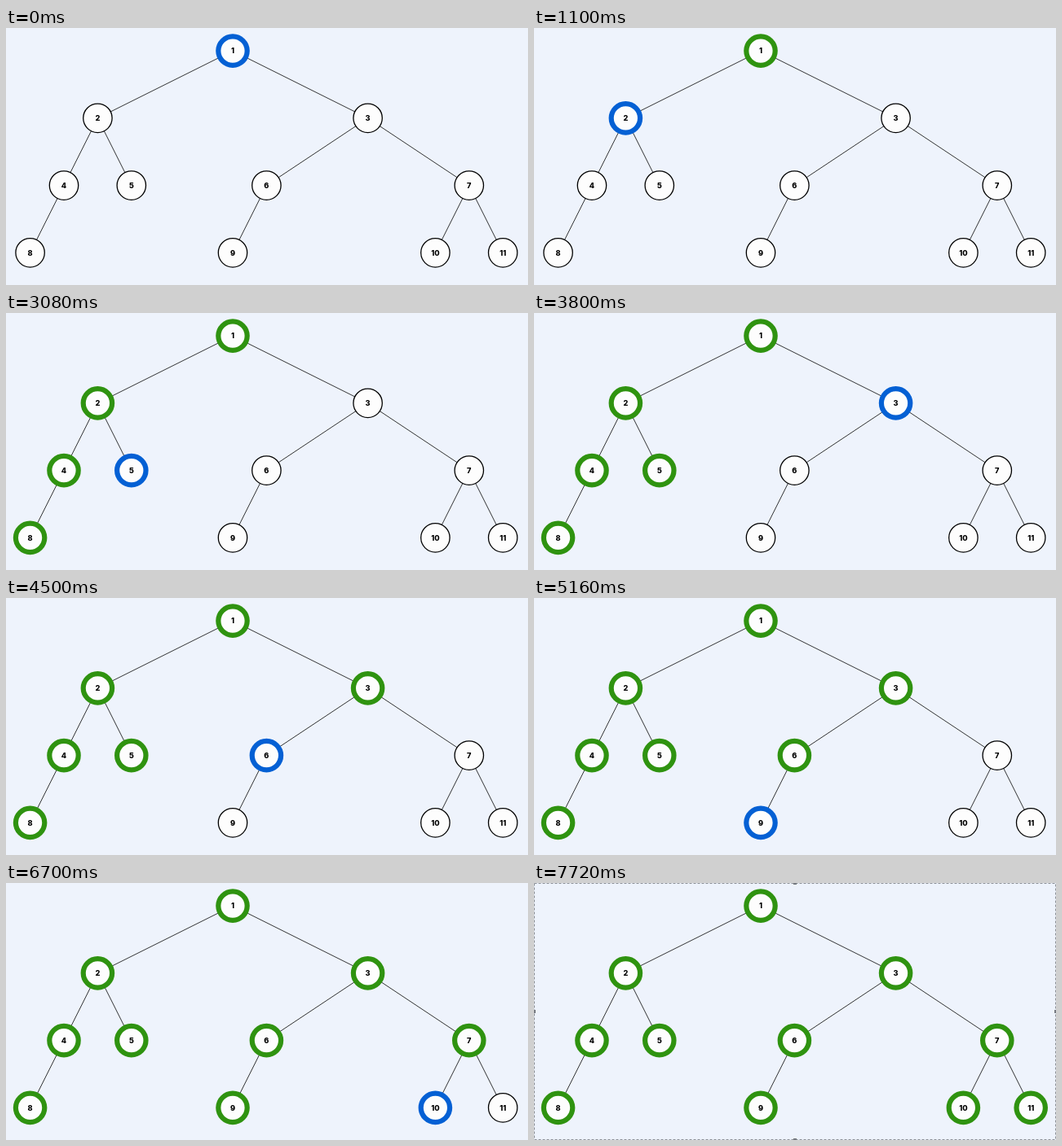
Recreate the animation shown at these times as an HTML page. Size 640 by 316 pixels, loop 8160 ms.

```html
<!DOCTYPE html>
<html lang="en">
<head>
<meta charset="utf-8">
<title>Preorder traversal</title>
<style>
  html, body { margin: 0; height: 100%; overflow: hidden; background: #eef3fc; }
  svg { display: block; width: 640px; height: 316px; }
  text { font: 800 9.2px Inter, Roboto, sans-serif; text-anchor: middle; }
  line { stroke: #111; stroke-width: .85; }
  circle { fill: #fdfdfd; stroke: #000; stroke-width: 1.3; }
  .visiting, .done { stroke: #0460d4; stroke-width: 6.2; }
  .done { stroke: #2f9310; }
  #frame rect { fill: none; stroke: #8d9198; stroke-dasharray: 3 2; }
  #frame path { fill: #777b82; }
</style>
</head>
<body>
<svg viewBox="0 0 640 316">
  <g id="edges"></g>
  <g id="nodes"></g>
  <g id="frame">
    <rect x=".5" y=".5" width="639" height="315"/>
    <path d="M318 0h4v2h-4zM318 314h4v2h-4zM0 156h2v4h-2zM638 156h2v4h-2z"/>
  </g>
</svg>
<script>
const LOOP = 8160, STEP = 719, VISIT = 400, FRAME_AT = 7720;
const COLUMN = 41.4, ROW = 82.75, RADIUS = 17.7;

// Children hang left and right of their parent, by its spread in columns.
const children = { 1: [2, 3], 2: [4, 5], 3: [6, 7], 4: [8], 6: [9], 7: [10, 11] };
const spread = { 1: 4, 3: 3 };

const edges = document.getElementById('edges');
const nodes = document.getElementById('nodes');
const frame = document.getElementById('frame');
const circles = [];

function add(group, tag, attributes) {
  const element = document.createElementNS('http://www.w3.org/2000/svg', tag);
  for (const name in attributes) element.setAttribute(name, attributes[name]);
  return group.appendChild(element);
}

// Builds the tree in preorder, so circles end up in visiting order.
function build(label, x, y) {
  circles.push(add(nodes, 'circle', { cx: x, cy: y, r: RADIUS }));
  add(nodes, 'text', { x, y: y + 3.3 }).textContent = label;
  (children[label] || []).forEach((child, side) => {
    const childX = x + (2 * side - 1) * (spread[label] || 1) * COLUMN;
    const childY = y + ROW;
    add(edges, 'line', { x1: x, y1: y, x2: childX, y2: childY });
    build(child, childX, childY);
  });
}

function draw(now) {
  const time = now % LOOP;
  circles.forEach((circle, order) => {
    const age = time - order * STEP;
    circle.setAttribute('class', age < 0 ? '' : age < VISIT ? 'visiting' : 'done');
  });
  frame.style.display = time >= FRAME_AT ? '' : 'none';
}

function tick() {
  draw(performance.now());
  requestAnimationFrame(tick);
}

build(1, 278, 28.1);
tick();
</script>
</body>
</html>
```
